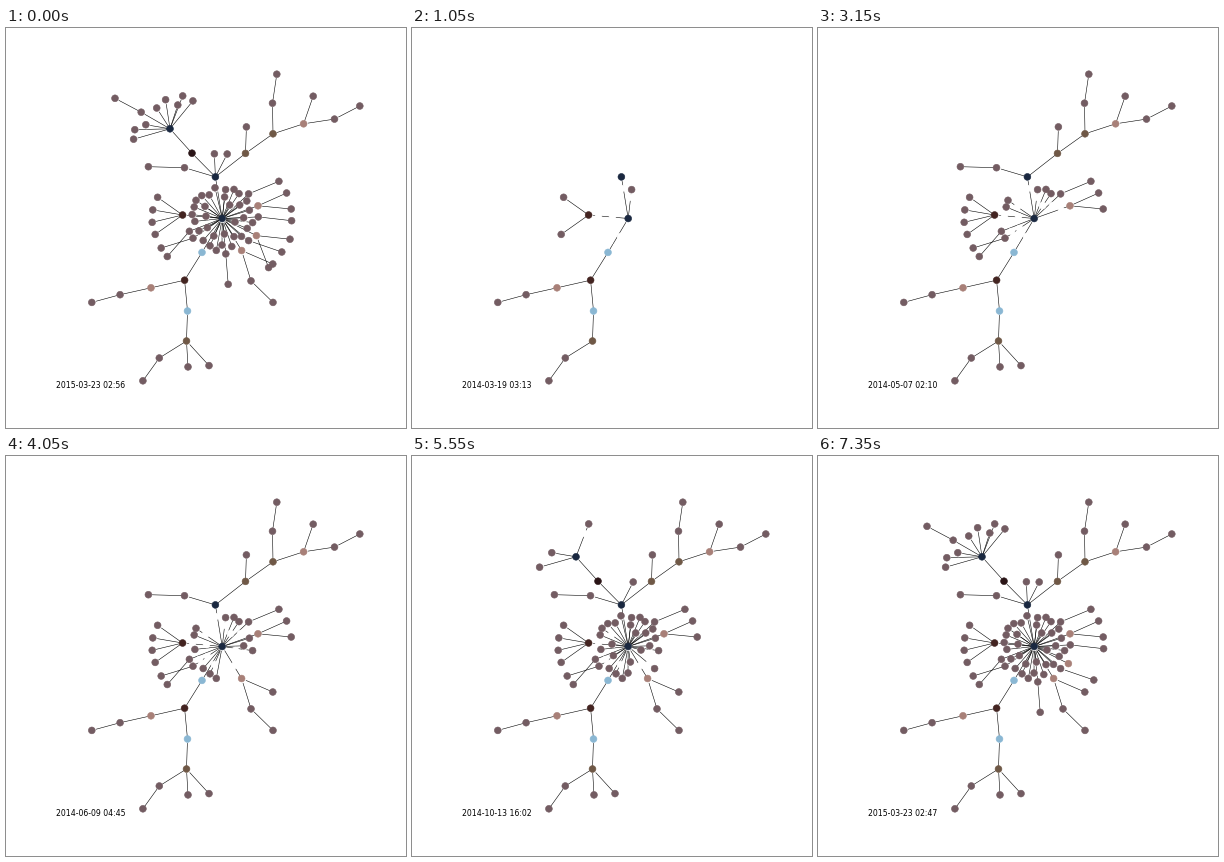
Write a matplotlib script that moves like this. It is 400 by 400 pixels and loops after 7500 ms.

```python
import numpy as np
import matplotlib.pyplot as plt
from matplotlib.animation import FuncAnimation
from matplotlib.collections import LineCollection

SIZE, DPI = 400, 40
FRAMES, INTERVAL = 50, 150

MAUVE, SALMON, BROWN = "#735c62", "#a88078", "#6f5846"
MAROON, BLACKISH, NAVY, BLUE = "#432421", "#2a1416", "#1a2840", "#8ab7d3"

# Branching points of the tree, in pixels
HUB = (216.2, 190.5)
NORTH, FORK, TOP_LEFT = (209.4, 148.9), (186, 125.2), (164, 100.8)
WEST, BEND, SOUTH = (176.6, 187), (196, 224.4), (178.6, 252.2)
LOWER, FOOT, TAIL = (181.5, 283), (180.5, 313), (145, 259.8)
ARM, ELBOW, HAND = (239.5, 125.4), (267, 105.8), (297.6, 95.8)
EAST, EAST_LOW, SOUTH_EAST = (252, 177.8), (250.4, 207.6), (235.6, 222.5)

COLORS = {
    HUB: NAVY, NORTH: NAVY, TOP_LEFT: NAVY,
    FORK: BLACKISH, WEST: MAROON, SOUTH: MAROON,
    BEND: BLUE, LOWER: BLUE,
    FOOT: BROWN, ARM: BROWN, ELBOW: BROWN,
    TAIL: SALMON, HAND: SALMON, EAST: SALMON,
    EAST_LOW: SALMON, SOUTH_EAST: SALMON,
}


def fan(parent, *children):
    return [(parent, c) for c in children]


def chain(*points):
    return list(zip(points, points[1:]))


# Each stage is (last step, edges in order of arrival)
STAGES = [
    (7, chain(HUB, BEND, SOUTH, LOWER, FOOT, (153.3, 330), (136.9, 352.8))
        + fan(HUB, WEST, NORTH)
        + fan(WEST, (151.6, 169.3), (149.2, 206.4))
        + chain(SOUTH, TAIL, (114.1, 266.7), (85.8, 274.4))
        + fan(HUB, (219.6, 161.6))),
    (16, chain(NORTH, ARM, ELBOW, HAND, (328.5, 91.1), (353.8, 78))
        + fan(HAND, (307.2, 68.2))
        + fan(WEST, (146.8, 181.9), (146.2, 194.3))
        + fan(FOOT, (182, 338.9), (203, 337.6))
        + fan(ARM, (240.4, 98.9))
        + chain(HUB, (183.4, 203.3), (161.3, 228.5))
        + fan(HUB, (233, 165.6))
        + chain(HUB, (242.6, 165.9), (272.9, 153.3))
        + chain(ELBOW, (266.5, 75.2), (270.8, 46.2))),
    (27, chain(HUB, (187, 210.2), (155.2, 220))
        + fan(HUB, EAST, (228, 161.4), (190, 172.3))
        + fan(EAST, (280.6, 165), (285.2, 181))
        + chain(NORTH, (178.5, 139.7), (142.4, 138.7))
        + fan(HUB, (188.2, 179), (188.9, 193.4), SOUTH_EAST)
        + fan(SOUTH_EAST, (266.8, 236))
        + chain(SOUTH_EAST, (245, 252.9), (267, 274.4))
        + fan(HUB, (197.2, 212.5), (204, 217.8), (210.3, 222.4),
              (243.4, 182.2), (237.7, 189.8), (246.6, 194.6))),
    (37, fan(HUB, (209, 159.8), (195.8, 167.6), (203.2, 166.9),
             (218.6, 169), (223.7, 177), (233.7, 177), (240.8, 173),
             (229, 194), (200, 188.2), (201.4, 199.6), (218.4, 206),
             (216, 217), (242.6, 212.6))
        + fan(NORTH, (221.2, 126), FORK)
        + fan(FORK, TOP_LEFT)
        + fan(TOP_LEFT, (139.8, 96.7), (127.6, 111.2), (176.7, 67.9))),
    (44, chain(TOP_LEFT, (135.2, 84.2), (109, 70.3))
        + fan(TOP_LEFT, (150.7, 80), (159.6, 71.7), (171.8, 77), (186.9, 72.9))
        + fan(NORTH, (208.4, 125.8))
        + fan(HUB, (186.2, 186.5), (193, 202.9), (199, 178.4), (207.8, 208),
              (228, 208.6), (235.5, 208.4))
        + fan((242.6, 212.6), (275.8, 224))),
    (49, fan(TOP_LEFT, (128.8, 101.7))
        + chain(HUB, (252.3, 188.9), (285.6, 192.7))
        + fan(HUB, (241.2, 200.4), (225.8, 218.5))
        + chain(HUB, (219.8, 225.9), (222.2, 256.3))
        + fan(HUB, EAST_LOW)),
    (50, fan(EAST_LOW, (284, 211.2), (262.6, 239.6))),
]

edges = [e for _, stage in STAGES for e in stage]
nodes = [HUB] + [child for _, child in edges]
colors = np.array([COLORS.get(n, MAUVE) for n in nodes])
nodes = np.array(nodes)

steps = [0] + [last for last, _ in STAGES]
counts = np.cumsum([0] + [len(stage) for _, stage in STAGES])

DATE_STEPS = [1, 7, 16, 27, 35, 37, 44, 49, 50]
DATES = np.array([
    "2014-03-10T09:24", "2014-03-19T03:13", "2014-04-09T12:00",
    "2014-06-09T04:45", "2014-10-02T11:37", "2014-10-13T16:02",
    "2015-01-02T18:04", "2015-03-23T02:47", "2015-03-23T02:56",
], dtype="datetime64[m]").astype(int)

fig = plt.figure(figsize=(SIZE / DPI, SIZE / DPI), dpi=DPI, facecolor="white")
ax = fig.add_axes([0, 0, 1, 1])
ax.set(xlim=(0, SIZE), ylim=(SIZE, 0))
ax.axis("off")

lines = LineCollection([], colors="black", linewidths=1, zorder=1)
ax.add_collection(lines)
# Nodes yet to come are white discs that mask the lines
ax.scatter(*nodes.T, s=150, c="white", linewidths=1, zorder=2)
dots = ax.scatter([], [], s=150, linewidths=1, zorder=3)
stamp = ax.text(50, 360, "", fontsize=14, family="DejaVu Sans", color="black")


def draw(frame):
    step = frame or FRAMES  # the loop opens on the full tree
    shown = int(round(np.interp(step, steps, counts)))
    lines.set_segments(edges[:shown])
    dots.set_offsets(nodes[:shown + 1])
    dots.set_color(colors[:shown + 1])
    minute = int(round(np.interp(step, DATE_STEPS, DATES)))
    stamp.set_text(str(np.datetime64(minute, "m")).replace("T", " "))
    return lines, dots, stamp


anim = FuncAnimation(fig, draw, frames=FRAMES, interval=INTERVAL,
                     init_func=lambda: draw(0), repeat=True, repeat_delay=0)
plt.show()
```
